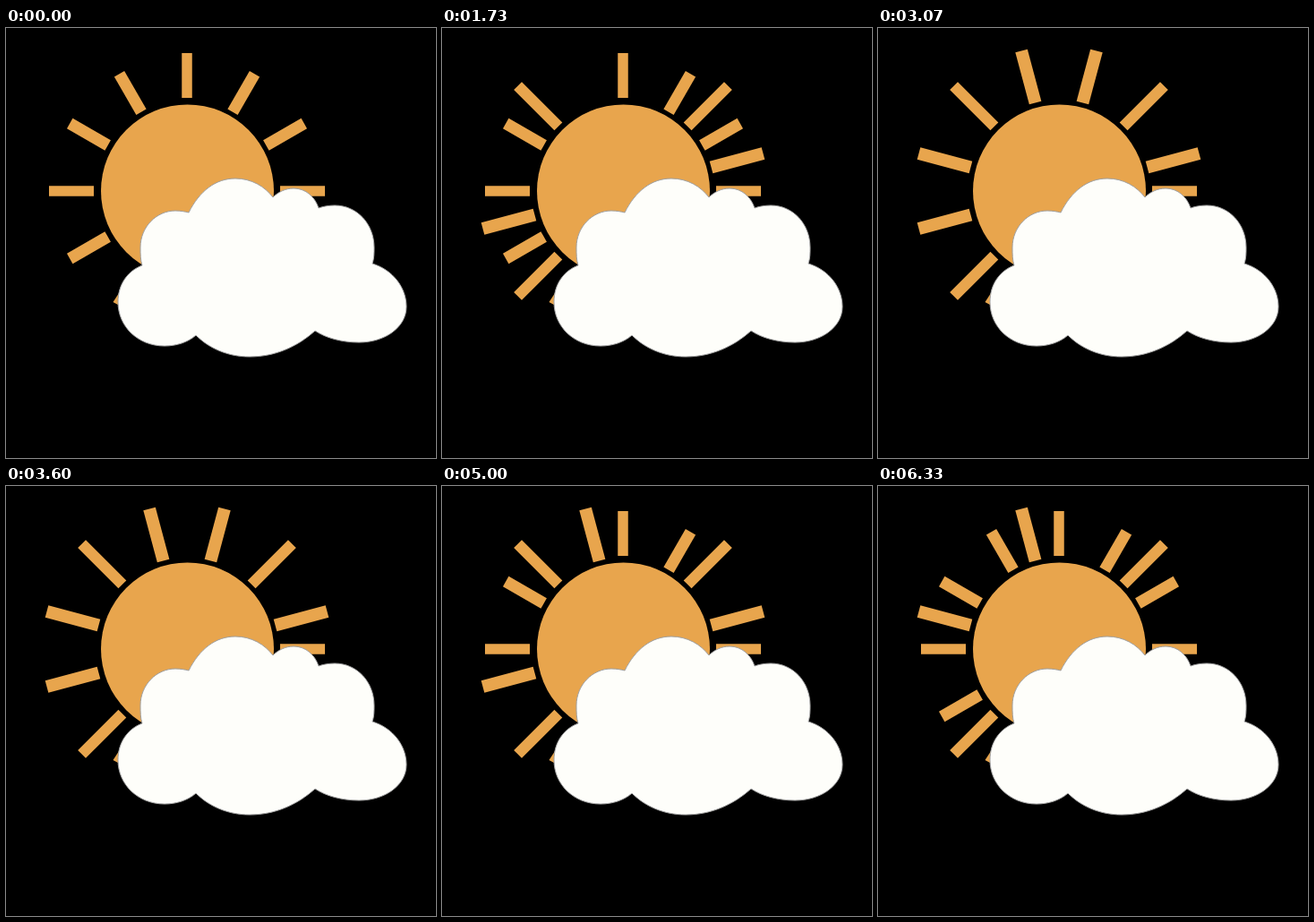
Animation, 480 px wide and 480 px high, one loop 6390 ms. Source, as an HTML page:

```html
<!DOCTYPE html>
<html lang="en">
<head>
<meta charset="utf-8">
<title>Sun behind a cloud</title>
<style>
  html, body { margin: 0; width: 100%; height: 100%; overflow: hidden; background: #000; }
  svg { display: block; width: 100vw; height: 100vh; }
</style>
</head>
<body>
<svg viewBox="0 0 480 480">
  <g fill="#e8a54d">
    <circle cx="202.5" cy="182" r="96.5"/>
    <polygon points="126,296 119.5,306 127,310"/>
    <g id="rays" transform="translate(202 182)"></g>
  </g>
  <path fill="#fefefa" stroke="#a0a0a0" stroke-width="1" d="M204 206
    C216 182 234 168 256 168 C274 168 289 177 298 189
    C304 183 312 179 321 179 C335 179 345 189 349 201
    C354 199 361 198 367 198 C392 198 411 219 411 245 C411 251 411 257 409 263
    C432 270 447 290 447 311 C447 334 423 351 394 351 C375 351 357 346 345 338
    C325 356 300 367 272 367 C247 367 226 357 212 343
    C203 351 190 355 177 355 C147 355 125 333 125 306 C125 286 136 271 152 265
    C150 259 150 252 150 245 C150 222 168 204 189 204 C195 204 200 205 204 206Z"/>
</svg>
<script>
const LOOP = 6390, FPS = 15;
const SHORT = [0, 30, 60, 240, 270, 300, 330];
const LONG = [15, 45, 75, 225, 255, 285, 315, 345];

// Angles lit in each step of the twinkle, clockwise from the top.
const STEPS = [
  SHORT,
  [...SHORT, 45, 225, 315],
  [0, 30, 60, 240, 270, 300, 45, 75, 225, 255, 315],
  [0, 30, 270, 300, 45, 75, 225, 255, 315, 345],
  [...LONG, 0, 270],
  [...LONG, 270],
  LONG,
  [...SHORT, 45, 225, 285, 345]
];

// Inner radius, outer radius and width of the ray at an angle.
function rayShape(angle) {
  if (angle % 90 === 0) return [104, 154, 11.5];
  if (angle % 30 === 0) return [102, 151, 13];
  return angle % 90 === 45 ? [102, 166, 12.5] : [102, 162, 14];
}

function addRay(angle) {
  const [inner, outer, width] = rayShape(angle);
  const ray = document.createElementNS("http://www.w3.org/2000/svg", "rect");
  const attrs = {
    x: -width / 2, y: -outer, width, height: outer - inner,
    transform: `rotate(${angle})`
  };
  for (const name in attrs) ray.setAttribute(name, attrs[name]);
  document.getElementById("rays").append(ray);
  return { angle, ray };
}

addRay(90);
const rays = [...SHORT, ...LONG].map(addRay);

// Steps begin on whole hundredths of a second.
const stepStart = i => Math.round(i * 100 / FPS) * 10;

function stepAt(t) {
  const i = Math.floor((t + 4) * FPS / 1000);
  return stepStart(i) > t ? i - 1 : i;
}

function draw(t) {
  const lit = STEPS[stepAt(t) % STEPS.length];
  for (const { angle, ray } of rays)
    ray.setAttribute("visibility", lit.includes(angle) ? "visible" : "hidden");
}

const begin = performance.now();
function tick() {
  draw((performance.now() - begin) % LOOP);
  requestAnimationFrame(tick);
}
tick();
</script>
</body>
</html>
```
